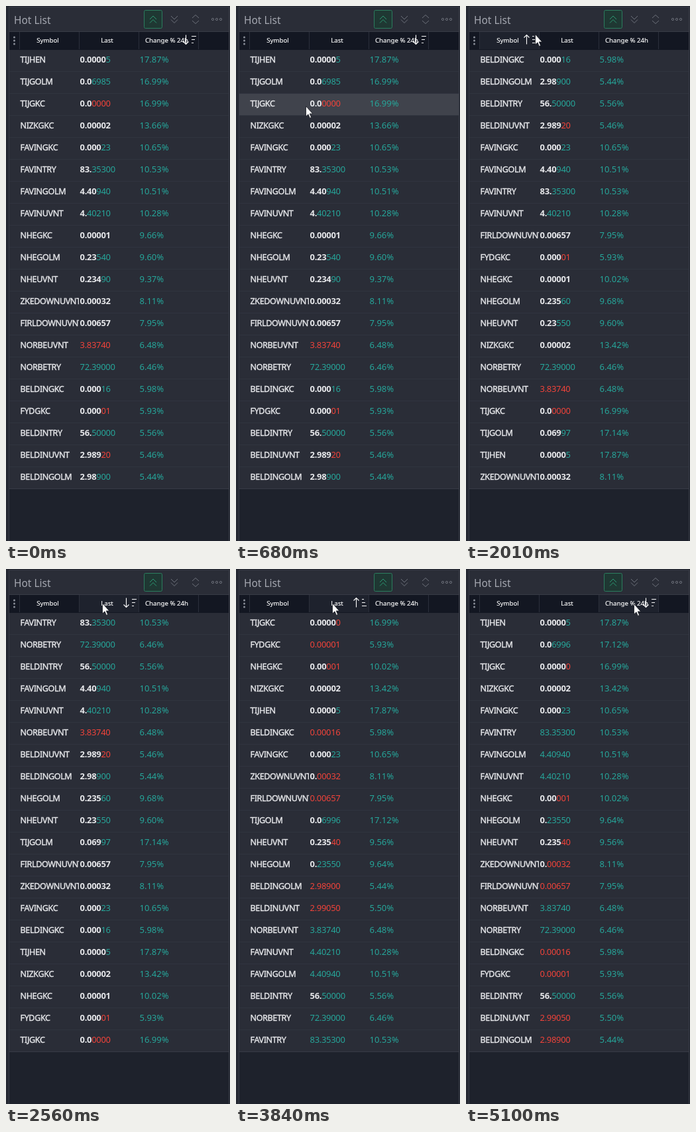
An HTML page that plays this animation: 338 px wide and 804 px high, repeating every 6.18 s.

```html
<!DOCTYPE html>
<html lang="en">
<head>
<meta charset="utf-8">
<title>Hot List</title>
<style>
  html, body { margin: 0; width: 100%; height: 100%; overflow: hidden; background: #1e222c; }
  svg { display: block; }
  text { font: 13px "Noto Sans", "Open Sans", sans-serif; letter-spacing: -.3px; fill: #e6e7ea; white-space: pre; }
  .title { font-size: 15.5px; letter-spacing: 0; fill: #a4a7b0; }
  .head text { font-size: 9.7px; letter-spacing: 0; text-anchor: middle; fill: #fff; stroke: #fff; stroke-width: .15; }
  .symbol { font-size: 12.6px; letter-spacing: -.4px; stroke: #e6e7ea; stroke-width: .4; }
  .same { font-weight: 600; }
  .up { fill: #26a69a; }
  .down { fill: #f0433a; }
  .change { letter-spacing: 0; }
  .icon { fill: none; stroke: #6d717b; stroke-width: 1; }
  .sort { fill: none; stroke: #fff; stroke-width: 1.1; }
</style>
</head>
<body>
<svg width="338" height="804" viewBox="0 0 338 804">
  <clipPath id="symbolCell"><path d="M20 66H110V726H20Z"/></clipPath>

  <path d="M0 0H338V39H0Z" fill="#2a2d37"/>
  <path d="M0 0H4V804H0Z" fill="#262933"/>
  <path d="M0 .5H338" stroke="#1e212a"/>
  <path d="M5 66H336V725H5Z" fill="#2a2d37"/>
  <path d="M5 39H336V66H5Z" fill="#131722"/>
  <rect id="hover"/>
  <g id="lines" stroke="#30343f"></g>
  <path d="M4.5 804V1.5H336.5V804M5 38.5H336M5 725.5H336" fill="none" stroke="#383b46"/>

  <text class="title" x="12" y="27">Hot List</text>
  <rect x="208.5" y="6.5" width="27" height="27" rx="2" fill="#1f3833" stroke="#2b7d5e"/>
  <path class="icon" style="stroke:#2b9a73" d="M217 20l5-5 5 5M217 25.500l5-5 5 5"/>
  <path class="icon" d="M249 15l5 5 5-5M249 20.500l5 5 5-5M281 18l5-4.500 5 4.500M281 22l5 4.500 5-4.500"/>
  <g class="icon"><circle cx="312" cy="20" r="1.600"/><circle cx="318" cy="20" r="1.600"/><circle cx="324" cy="20" r="1.600"/></g>

  <g class="head">
    <path d="M20.500 39V65M110.500 39V65M200.500 39V65M290.500 39V65" stroke="#2b2f3b"/>
    <g fill="#8a8e98"><circle cx="12.500" cy="47" r="1.500"/><circle cx="12.500" cy="52" r="1.500"/><circle cx="12.500" cy="57" r="1.500"/></g>
    <text x="63" y="55">Symbol</text>
    <text x="152.500" y="55">Last</text>
    <text x="242.500" y="55">Change % 24h</text>
  </g>
  <path id="sort" class="sort"/>
  <g id="rows"></g>
  <path id="cursor" d="M.5 .5V16L4 12.800 6.400 18.400 8.600 17.400 6.300 11.900H10.800Z" fill="#fff" stroke="#15171f" stroke-width=".8"/>
</svg>

<script>
const LOOP = 6180, TOP = 66, ROW = 33, COUNT = 20;
const $ = id => document.getElementById(id);

// Symbol, then "price change" per market update; an empty update keeps the last one.
// + or - marks where the rising or falling digits begin.
const market = `TIJHEN 0.0000+5 17.87
TIJGOLM 0.0+6985 16.99|0.069+97 17.14|0.0+6996 17.12
TIJGKC 0.0-0000 16.99||0.0000-0 16.99
NIZKGKC 0.00002 13.66|0.00002 13.42
FAVINGKC 0.000+23 10.65
FAVINTRY 83.+35300 10.53||+83.35300 10.53
FAVINGOLM 4.40+940 10.51||+4.40940 10.51
FAVINUVNT 4.+40210 10.28||+4.40210 10.28
NHEGKC 0.00001 9.66|0.00001 10.02|0.00-001 10.02
NHEGOLM 0.23+540 9.60|0.235+60 9.68|0.+23550 9.64
NHEUVNT 0.234+90 9.37|0.23+550 9.60|0.235-40 9.56
ZKEDOWNUVNT 0.00032 8.11||0.-00032 8.11
FIRLDOWNUVNT 0.00657 7.95||-0.00657 7.95
NORBEUVNT -3.83740 6.48||+3.83740 6.48
NORBETRY +72.39000 6.46
BELDINGKC 0.000+16 5.98||-0.00016 5.98
FYDGKC 0.000-01 5.93||-0.00001 5.93
BELDINTRY 56.+50000 5.56
BELDINUVNT 2.989-20 5.46||-2.99050 5.50
BELDINGOLM 2.98+900 5.44||-2.98900 5.44`.split("\n").map(line => {
  const [, symbol, updates] = line.match(/^(\S+) (.*)/);
  return { symbol, quotes: updates.split("|").map(u => u.split(" ")) };
});

// [time, sorted column, direction, market update]
const views = [
  [0, 2, -1, 0], [1230, 0, 1, 1], [2560, 1, -1, 1], [3190, 1, 1, 1],
  [3840, 1, 1, 2], [3990, 1, -1, 2], [4530, 2, 1, 2], [5100, 2, -1, 2]
];
// [time, x, y]
const pointer = [
  [0, -50, -50], [440, 190, 752], [520, 160, 545], [600, 130, 325], [680, 105, 150],
  [750, 88, 82], [830, 74, 45], [2010, 104, 42], [2080, 119, 46], [2250, 133, 49],
  [2320, 145, 51], [4060, 242, 51], [4130, 219, 51], [4680, 238, 52], [4760, 253, 52]
];
const at = (steps, time) => steps.findLast(step => step[0] <= time);

function snapshot(update) {
  return market.map(({ symbol, quotes }) => {
    const [price, change] = quotes.slice(0, update + 1).findLast(q => q[0]);
    return { symbol, price, keys: [symbol, +price.replace(/[+-]/, ""), +change], change };
  });
}

function compare(a, b, column) {
  const order = column === 0 ? [0] : column === 1 ? [1, 2] : [2, 1];
  for (const k of order) {
    if (a.keys[k] !== b.keys[k]) return a.keys[k] < b.keys[k] ? -1 : 1;
  }
  return 0;
}

function rowMarkup({ symbol, price, change }, i) {
  const y = TOP + 19 + i * ROW;
  const [same, sign, moved = ""] = price.split(/([+-])/);
  return `<text class="symbol" x="21.5" y="${y}" clip-path="url(#symbolCell)">${symbol}</text>
    <text x="111.5" y="${y}"><tspan class="same">${same}</tspan><tspan class="${sign === "+" ? "up" : "down"}">${moved}</tspan></text>
    <text class="change up" x="201.5" y="${y}">${change}%</text>`;
}

function drawView([, column, direction, update]) {
  const rows = snapshot(update).sort((a, b) => direction * compare(a, b, column));
  $("rows").innerHTML = rows.map(rowMarkup).join("");
  const x = 91.5 + column * 90;
  const head = direction > 0 ? `M${x - 4} 47.5l4-4 4 4` : `M${x - 4} 53.5l4 4 4-4`;
  const widths = direction > 0 ? [3, 5, 7] : [7, 5, 3];
  $("sort").setAttribute("d", `M${x} 43.5V57.5${head}` +
    widths.map((w, i) => `M${x + 8.5} ${45.5 + i * 5}h${w}`).join(""));
}

function drawPointer([, x, y]) {
  $("cursor").setAttribute("transform", `translate(${x} ${y})`);
  const row = Math.floor((y - TOP) / ROW), column = Math.floor((x - 20) / 90);
  const box = (x, y, width, height, fill) =>
    Object.entries({ x, y, width, height, fill }).forEach(([k, v]) => $("hover").setAttribute(k, v));
  if (y > 39 && y < TOP) box(21 + column * 90, 39, 89, 26, "#1e222d");
  else if (row >= 0 && row < COUNT) box(5, TOP + row * ROW, 331, ROW, "#40434c");
  else box(0, 0, 0, 0, "none");
}

$("lines").innerHTML = Array.from({ length: COUNT - 1 }, (_, i) =>
  `<path d="M5 ${TOP + (i + 1) * ROW - .5}H336"/>`).join("");

let view, spot;
function frame() {
  const time = performance.now() % LOOP;
  const nextView = at(views, time), nextSpot = at(pointer, time);
  if (nextView !== view) drawView(view = nextView);
  if (nextSpot !== spot) drawPointer(spot = nextSpot);
  requestAnimationFrame(frame);
}
frame();
</script>
</body>
</html>
```
